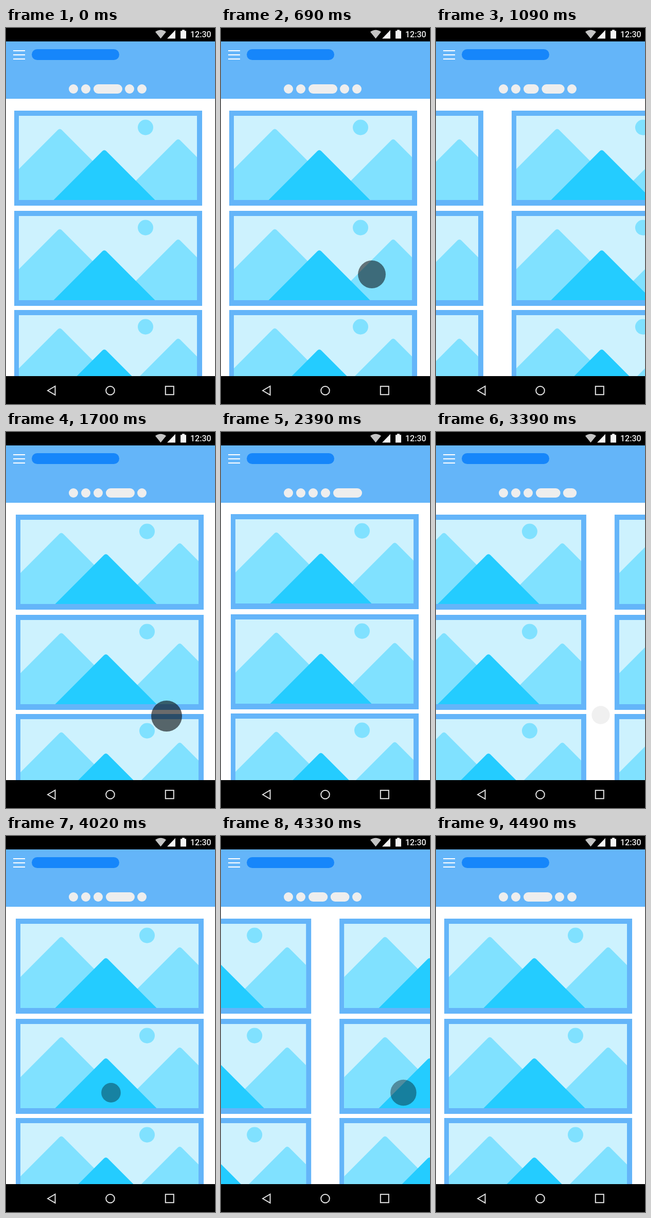
An HTML page that plays this animation: 406x728 px, repeating every 4810 ms.

```html
<!DOCTYPE html>
<html lang="en">
<head>
<meta charset="utf-8">
<title>Swipe between pages</title>
<style>
  html, body { margin: 0; width: 100%; height: 100%; overflow: hidden; background: #fff; }
  body > svg { display: block; width: 100%; height: 100%; }
</style>
</head>
<body>
<svg viewBox="0 0 406 728">
  <defs>
    <g id="card">
      <rect width="365" height="184" fill="#64b5f9"/>
      <svg x="9" y="10" width="346" height="163" viewBox="9 10 346 163">
        <rect width="365" height="184" fill="#cdf2fe"/>
        <g fill="#80e1ff">
          <circle cx="255" cy="32.5" r="15"/>
          <use href="#hill" x="88.5" y="33.5"/>
          <use href="#hill" x="318.5" y="53.5"/>
        </g>
        <use href="#hill" x="175" y="74.5" fill="#24ccff"/>
      </svg>
    </g>
    <path id="hill" d="M-200 200L-4 4Q0 0 4 4L200 200Z"/>
    <g id="page">
      <use href="#card"/>
      <use href="#card" y="194"/>
      <use href="#card" y="386"/>
    </g>
  </defs>

  <rect width="406" height="728" fill="#fff"/>
  <g id="pages"></g>

  <rect y="26" width="406" height="111" fill="#64b5f9"/>
  <path d="M14 44H37M14 52H37M14 60H37" stroke="#fff" stroke-width="2"/>
  <rect x="50" y="41" width="170" height="21" rx="10.5" fill="#1686fa"/>
  <g id="dots" fill="#eee"></g>

  <rect width="406" height="26"/>
  <path d="M290 7.5Q300.5 0 311 7.5L300.5 20.5Z" fill="#c4c4c4"/>
  <path d="M313 20.5H329V4Z" fill="#f4f4f4"/>
  <path d="M339 5.5H342V3.5H347V5.5H350V20.5H339Z" fill="#f4f4f4"/>
  <text x="358" y="18" font-family="Roboto, sans-serif" font-size="16" font-weight="500" fill="#eee">12:30</text>

  <rect y="674" width="406" height="54"/>
  <g fill="none" stroke="#e4e4e4" stroke-width="2">
    <path d="M81 702L95.5 693.5V710.5Z"/>
    <circle cx="202.5" cy="702" r="8.3"/>
    <rect x="309.8" y="693.8" width="16" height="16"/>
  </g>

  <circle id="touch"/>
</svg>
<script>
const LOOP = 4810, STEP = 77.3, PITCH = 420;
const $ = id => document.getElementById(id);
const clamp = v => Math.max(0, Math.min(1, v));
const ramp = (t, from, to) => clamp((t - from) / (to - from));
const smooth = v => v * v * (3 - 2 * v);

function add(parent, tag, attrs) {
  const el = document.createElementNS("http://www.w3.org/2000/svg", tag);
  set(el, attrs);
  parent.append(el);
  return el;
}
function set(el, attrs) {
  for (const k in attrs) el.setAttribute(k, attrs[k]);
}

// press: finger grows; drag: finger moves; slide: page moves (start, end)
const swipes = [
  { press: 515, drag: 850, slide: [870, 1190], dir: 1, from: [293, 477], to: [132, 477] },
  { press: 1470, drag: 1722, slide: [2085, 2385], dir: 1, from: [312, 550], to: [151, 552] },
  { press: 2960, drag: 3190, slide: [3175, 3485], dir: -1, from: [151, 550], to: [320, 548] },
  { press: 3890, drag: 4180, slide: [4165, 4470], dir: -1, from: [204, 497], to: [369, 497] }
];

const pages = [2, 3, 4].map(i => ({ i, el: add($("pages"), "use", { href: "#page" }) }));
const dots = [0, 1, 2, 3, 4].map(() => add($("dots"), "rect", { y: 109, height: 18, rx: 9 }));

function drawTouch(t) {
  const s = swipes.find(s => t >= s.press && t < s.drag + 213);
  if (!s) return set($("touch"), { r: 0 });
  const grow = ramp(t, s.press, s.press + 190);
  const fade = ramp(t, s.drag + 100, s.drag + 213);
  const move = smooth(ramp(t, s.drag, s.drag + 170));
  const at = k => s.from[k] + (s.to[k] - s.from[k]) * move;
  set($("touch"), {
    cx: at(0), cy: at(1),
    r: 30 * grow * (1 - 0.46 * fade),
    "fill-opacity": 0.58 * grow * (1 - fade)
  });
}

function draw(t) {
  const pos = swipes.reduce((p, s) => p + s.dir * smooth(ramp(t, ...s.slide)), 2);
  const left = 16 + 3 * clamp(pos - 2);
  const top = pos > 3.9 ? 159 : 160;
  for (const p of pages) set(p.el, { x: left + PITCH * (p.i - pos), y: top });

  let x = 122;
  dots.forEach((dot, i) => {
    const active = clamp(1 - Math.abs(i - pos));
    const width = 18 + 38 * active;
    set(dot, { x, width });
    x += width + 6 - active;
  });
  drawTouch(t);
}

// Motion advances in even steps of about 13 per second.
function tick(now) {
  const n = Math.floor((now % LOOP + 15) / STEP);
  draw(Math.max(0, n * STEP - 10));
  requestAnimationFrame(tick);
}
draw(0);
requestAnimationFrame(tick);
</script>
</body>
</html>
```
